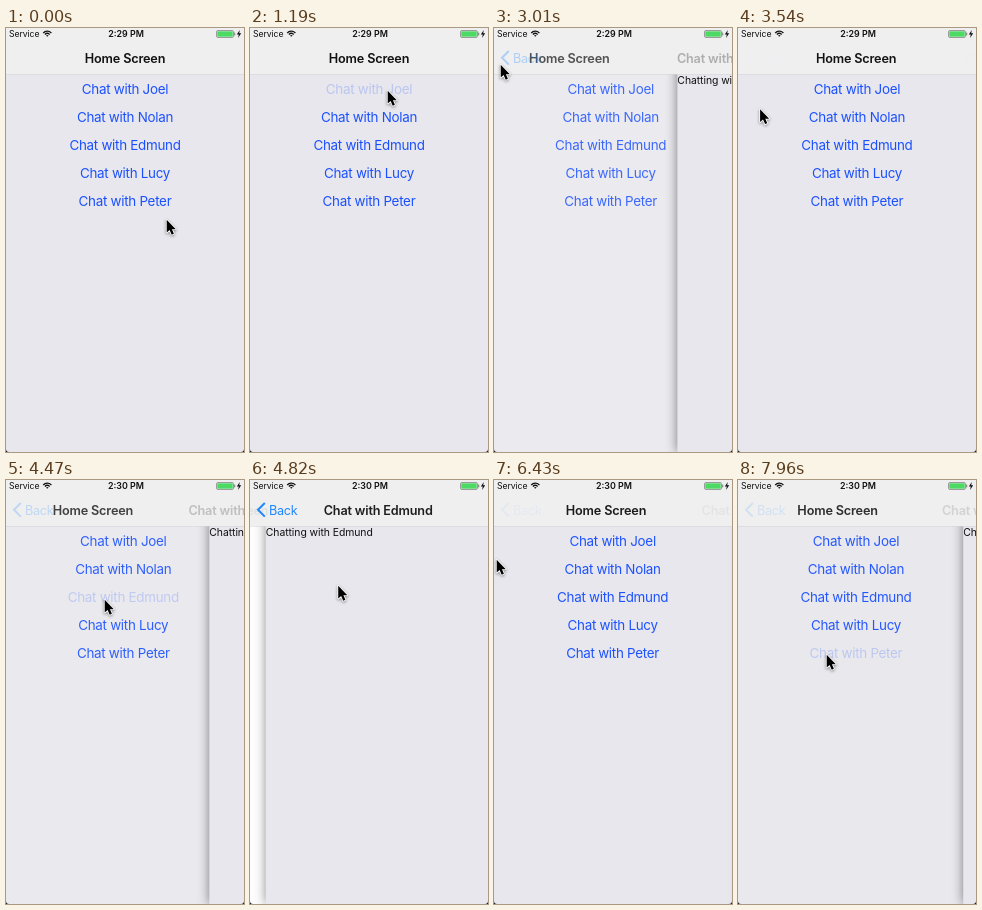
Write an HTML page with a canvas that moves like this. It is 238 px wide and 424 px high and loops after 8 s.

```html
<!DOCTYPE html>
<html lang="en">
<head>
<meta charset="utf-8">
<title>Chat navigation</title>
<style>
  html, body { margin: 0; height: 100%; overflow: hidden; }
  canvas { display: block; width: 238px; height: 424px; }
</style>
</head>
<body>
<canvas id="stage"></canvas>
<script>
const W = 238, H = 424, BAR = 46, LOOP = 8000;
const canvas = document.getElementById('stage');
const ctx = canvas.getContext('2d');
const dpr = window.devicePixelRatio || 1;
canvas.width = W * dpr;
canvas.height = H * dpr;

const names = ['Joel', 'Nolan', 'Edmund', 'Lucy', 'Peter'];

// Taps alternate between opening a chat and going back: press time, hold time, chat
const taps = [
  [1190, 15, 0], [2720, 122, 0],
  [4290, 148, 2], [5890, 121, 2],
  [7720, 222, 4]
];

// Pointer moves: from time, to time, where to
const start = [160, 191];
const moves = [
  [240, 540, 137, 62], [1750, 2120, 17, 28], [2840, 3010, 6, 36],
  [3400, 3800, 60, 192], [3800, 4120, 98, 119], [4700, 5180, 32, 31],
  [6010, 6430, 2, 79], [6470, 7250, 88, 174]
];

const ease = u => u * u * (3 - 2 * u);
const clamp = u => Math.min(1, Math.max(0, u));

function pointerAt(t) {
  let [x, y] = start;
  for (const [from, to, tx, ty] of moves) {
    const e = ease(clamp((t - from) / (to - from)));
    x += (tx - x) * e;
    y += (ty - y) * e;
  }
  return [x, y];
}

// s: 0 = home, 1 = chat; each slide decays towards its end like a stiff spring
function stateAt(t) {
  const i = taps.findLastIndex(([press]) => press <= t);
  if (i < 0) return { s: 0, who: 0, lit: -1, backHeld: false };
  const [press, hold, who] = taps[i];
  const opening = i % 2 === 0;
  const rest = Math.exp(-0.0073 * Math.max(0, t - press - hold));
  return {
    s: opening ? 1 - rest : rest,
    who,
    lit: opening ? who : -1,
    backHeld: !opening && rest === 1
  };
}

function text(str, x, y, size, { color = '#111', weight = 400, align = 'left', track = 0, alpha = 1 } = {}) {
  ctx.save();
  ctx.globalAlpha *= alpha;
  ctx.font = `${weight} ${size}px Inter, "Liberation Sans", sans-serif`;
  ctx.letterSpacing = track + 'px';
  ctx.textAlign = align;
  ctx.fillStyle = color;
  ctx.fillText(str, x, y);
  ctx.restore();
}

function rect(x, y, w, h, color) {
  ctx.fillStyle = color;
  ctx.fillRect(x, y, w, h);
}

function drawHome(s, lit) {
  rect(0, 0, W, H, '#fff');
  ctx.save();
  ctx.globalAlpha = 1 - s ** 1.5;
  rect(0, 0, W, H, '#e8e7ed');
  names.forEach((name, i) => text('Chat with ' + name, W / 2 - 8 * s, 65.5 + 28.1 * i, 13.4,
    { color: '#1a50ff', align: 'center', track: -0.28, alpha: i === lit ? 0.22 : 1 }));
  ctx.restore();
}

function drawChat(s, name) {
  const x = 258.7 * (1 - s);
  ctx.save();
  ctx.shadowColor = 'rgba(0,0,0,.5)';
  ctx.shadowBlur = 11 * dpr;
  rect(x, 0, W + 20, H, '#e8e7ed');
  ctx.restore();
  text('Chatting with ' + name, x, 56, 10.4, { track: -0.06 });
}

function drawBar(s, name, backAlpha) {
  rect(0, 0, W, BAR, '#efeff0');
  rect(0, BAR, W, 0.5, '#d0d0d3');
  const title = { weight: 600, align: 'center', track: -0.16 };
  text('Home Screen', W / 2 - 150 * s, 34.5, 12.65, { ...title, alpha: 1 - s });
  text('Chat with ' + name, W / 2 + 150 * (1 - s), 34.5, 12.65, { ...title, alpha: s });
  ctx.save();
  ctx.globalAlpha = backAlpha;
  ctx.strokeStyle = '#1080ff';
  ctx.lineWidth = 2;
  ctx.stroke(new Path2D('M14.8 23 L8 29.8 L14.8 36.6'));
  text('Back', 19, 34.5, 12.65, { color: '#1080ff', track: -0.3 });
  ctx.restore();
}

function drawWifi(x, y) {
  ctx.strokeStyle = '#111';
  ctx.lineWidth = 1.3;
  for (let r = 1; r < 6; r += 2.3) {
    ctx.beginPath();
    ctx.arc(x, y, r, -Math.PI * 0.76, -Math.PI * 0.24);
    ctx.stroke();
  }
}

function drawStatus(t) {
  text('Service', 3, 9, 8.7, { track: -0.1 });
  text(t < 3800 ? '2:29 PM' : '2:30 PM', 120, 9, 8.9, { weight: 600, align: 'center' });
  drawWifi(41.3, 8.8);
  ctx.lineWidth = 0.7;
  ctx.strokeStyle = '#777';
  ctx.beginPath();
  ctx.roundRect(210.5, 2.5, 17, 7, 1.4);
  ctx.stroke();
  rect(211.3, 3.3, 15.4, 5.4, '#4cd964');
  rect(228.2, 4.6, 1, 2.8, '#777');
  ctx.fillStyle = '#111';
  ctx.fill(new Path2D('M233.8 2 l-3 4.5 h2 l-.8 3.5 l3.2 -4.8 h-2 z'));
}

function drawPointer(x, y) {
  const arrow = new Path2D('M0 0 V14 L3.2 11.1 L5.5 16.3 L7.9 15.3 L5.7 10.3 H10 Z');
  ctx.save();
  ctx.translate(x + 0.7, y + 0.8);
  ctx.scale(0.91, 0.91);
  ctx.lineJoin = 'round';
  ctx.lineWidth = 1.8;
  ctx.strokeStyle = '#fff';
  ctx.fillStyle = '#000';
  ctx.shadowColor = 'rgba(0,0,0,.45)';
  ctx.shadowBlur = 3 * dpr;
  ctx.shadowOffsetY = dpr;
  ctx.stroke(arrow);
  ctx.shadowColor = 'transparent';
  ctx.fill(arrow);
  ctx.restore();
}

function drawCorners() {
  ctx.fillStyle = '#111';
  ctx.fill(new Path2D(`M0 ${H} v-3 q0 3 3 3 z M${W} ${H} v-3 q0 3 -3 3 z`));
}

function draw(t) {
  const { s, who, lit, backHeld } = stateAt(t);
  ctx.setTransform(dpr, 0, 0, dpr, 0, 0);
  drawHome(s, lit);
  if (s > 0) drawChat(s, names[who]);
  drawBar(s, names[who], backHeld ? 0.2 : s);
  drawStatus(t);
  drawCorners();
  drawPointer(...pointerAt(t));
}

function loop() {
  draw(performance.now() % LOOP);
  requestAnimationFrame(loop);
}
loop();
</script>
</body>
</html>
```
